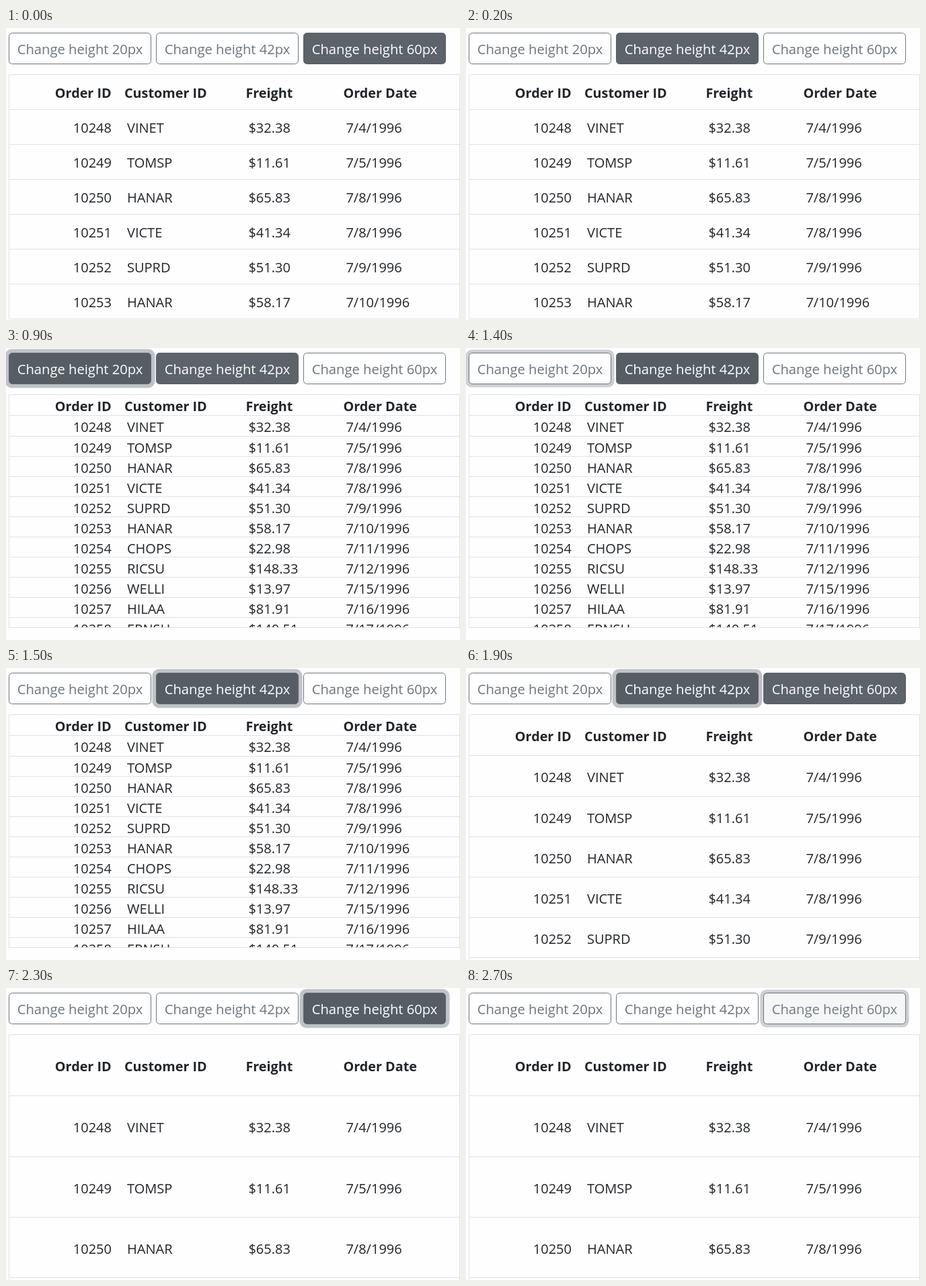
Animation, 675 px wide and 435 px high, one loop 2.8 s. Source, as an HTML page:

```html
<!DOCTYPE html>
<html lang="en">
<head>
<meta charset="utf-8">
<title>Row height</title>
<style>
  html, body { margin: 0; width: 100%; height: 100%; overflow: hidden; background: #fefefe; }
  svg { display: block; font: 20.2px "Open Sans", "Noto Sans", sans-serif; }
  #grid text { fill: #212529; font-size: 20px; }
  #grid .head { font-size: 19.8px; font-weight: 700; }
  #grid path { fill: none; stroke: #dee2e6; }
</style>
</head>
<body>
<svg id="stage" width="675" height="435" viewBox="0 0 675 435">
  <clipPath id="clip"><rect id="clipBox" x="0" y="69" width="675"/></clipPath>
  <g id="grid">
    <g id="cells" clip-path="url(#clip)"></g>
    <path id="frame"/>
  </g>
  <g id="buttons"></g>
</svg>
<script>
const LOOP = 2800;
const $ = id => document.getElementById(id);

function add(parent, tag, attrs, text) {
  const el = document.createElementNS("http://www.w3.org/2000/svg", tag);
  set(el, attrs);
  if (text) el.textContent = text;
  parent.appendChild(el);
  return el;
}

function set(el, attrs) {
  for (const key in attrs) el.setAttribute(key, attrs[key]);
}

const orders = `VINET 32.38 4
TOMSP 11.61 5
HANAR 65.83 8
VICTE 41.34 8
SUPRD 51.30 9
HANAR 58.17 10
CHOPS 22.98 11
RICSU 148.33 12
WELLI 13.97 15
HILAA 81.91 16
ERNSH 140.51 17`.split("\n").map((line, i) => {
  const [customer, freight, day] = line.split(" ");
  return [10248 + i, customer, "$" + freight, `7/${day}/1996`];
});

// line: header's lower edge, head and first: text baselines
const layouts = {
  normal: { line: 121.9, pitch: 52, head: 104, first: 156, bottom: 433.5 },
  small: { line: 100.95, pitch: 30.1, head: 94, first: 125.4, bottom: 416.5 },
  medium: { line: 130.9, pitch: 60.2, head: 109, first: 170.4, bottom: 434.5 },
  large: { line: 160.8, pitch: 90.3, head: 124, first: 215.4, bottom: 434.5 }
};

const looks = {
  plain: { fill: "#fefefe", stroke: "#6c757d", text: "#6c757d" },
  faint: { fill: "#f9f9fa", stroke: "#6c757d", text: "#747c84" },
  pale: { fill: "#f5f6f6", stroke: "#6c757d", text: "#737b82" },
  hover: { fill: "#5c636a", stroke: "#565e64", text: "#fff" },
  pressed: { fill: "#565e64", stroke: "#5e666c", text: "#fff" }
};

const strong = { color: "#bfc3c7", spread: 5.6 };
const soft = { color: "#cdd0d3", spread: 4.6 };

// Each step changes only the listed parts of the state.
const steps = [
  [0, { layout: "normal", looks: ["plain", "plain", "hover"], ring: -1, glow: strong }],
  [100, { looks: ["plain", "hover", "hover"] }],
  [200, { looks: ["plain", "hover", "plain"] }],
  [400, { looks: ["hover", "hover", "plain"] }],
  [600, { looks: ["pressed", "faint", "plain"] }],
  [700, { ring: 0 }],
  [800, { layout: "small", looks: ["pressed", "plain", "plain"] }],
  [900, { looks: ["pressed", "hover", "plain"] }],
  [1400, { looks: ["plain", "pressed", "plain"], glow: soft }],
  [1500, { ring: 1, glow: strong }],
  [1600, { layout: "medium" }],
  [1900, { looks: ["plain", "pressed", "hover"] }],
  [2100, { looks: ["plain", "plain", "pressed"], glow: soft }],
  [2200, { ring: 2, glow: strong }],
  [2300, { layout: "large" }],
  [2700, { looks: ["plain", "plain", "pale"], glow: soft }]
];

const header = ["Order ID", "Customer ID", "Freight", "Order Date"].map((title, i) =>
  add($("cells"), "text", { x: [72.8, 176, 356.4, 501.4][i], class: "head" }, title));

const rows = orders.map(order => ({
  cells: order.map((value, i) => add($("cells"), "text", {
    x: [157, 180, 360.4, 505.4][i],
    "text-anchor": i ? "start" : "end"
  }, String(value))),
  line: add($("cells"), "path", {})
}));
const headLine = add($("cells"), "path", {});

const buttons = [20, 42, 60].map((size, i) => {
  const x = 4 + 219 * i;
  const g = $("buttons");
  return {
    x,
    ring: add(g, "rect", {}),
    box: add(g, "rect", { x: x + .5, y: 7.5, width: 211, height: 46, rx: 5 }),
    label: add(g, "text", { x: x + 106, y: 39, "text-anchor": "middle" }, `Change height ${size}px`)
  };
});

const rule = y => ({ d: `M5 ${Math.floor(y) + .5}H674` });

function drawGrid({ line, pitch, head, first, bottom }) {
  header.forEach(el => set(el, { y: head }));
  set(headLine, rule(line));
  rows.forEach((row, i) => {
    const y = Math.round(first + pitch * i);
    row.cells.forEach(el => set(el, { y }));
    set(row.line, rule(line + pitch * (i + 1)));
  });
  const open = bottom > 434;
  set($("clipBox"), { height: bottom - 69 });
  set($("frame"), { d: open ? "M4.5 435V69.5H674.5V435" : `M4.5 69.5H674.5V${bottom}H4.5Z` });
}

function drawButtons({ looks: names, ring, glow: { color, spread } }) {
  buttons.forEach((button, i) => {
    const look = looks[names[i]];
    set(button.ring, {
      x: button.x - spread, y: 7 - spread,
      width: 212 + 2 * spread, height: 47 + 2 * spread,
      rx: 5 + spread,
      fill: ring === i ? color : "none"
    });
    set(button.box, { fill: look.fill, stroke: look.stroke });
    set(button.label, { fill: look.text });
  });
}

let shown = -1;

function render(now) {
  const t = now % LOOP;
  const count = steps.filter(([start]) => start <= t).length;
  if (count !== shown) {
    const state = Object.assign({}, ...steps.slice(0, count).map(step => step[1]));
    drawGrid(layouts[state.layout]);
    drawButtons(state);
    shown = count;
  }
}

const begin = performance.now();
function tick() {
  render(performance.now() - begin);
  requestAnimationFrame(tick);
}
tick();
</script>
</body>
</html>
```
